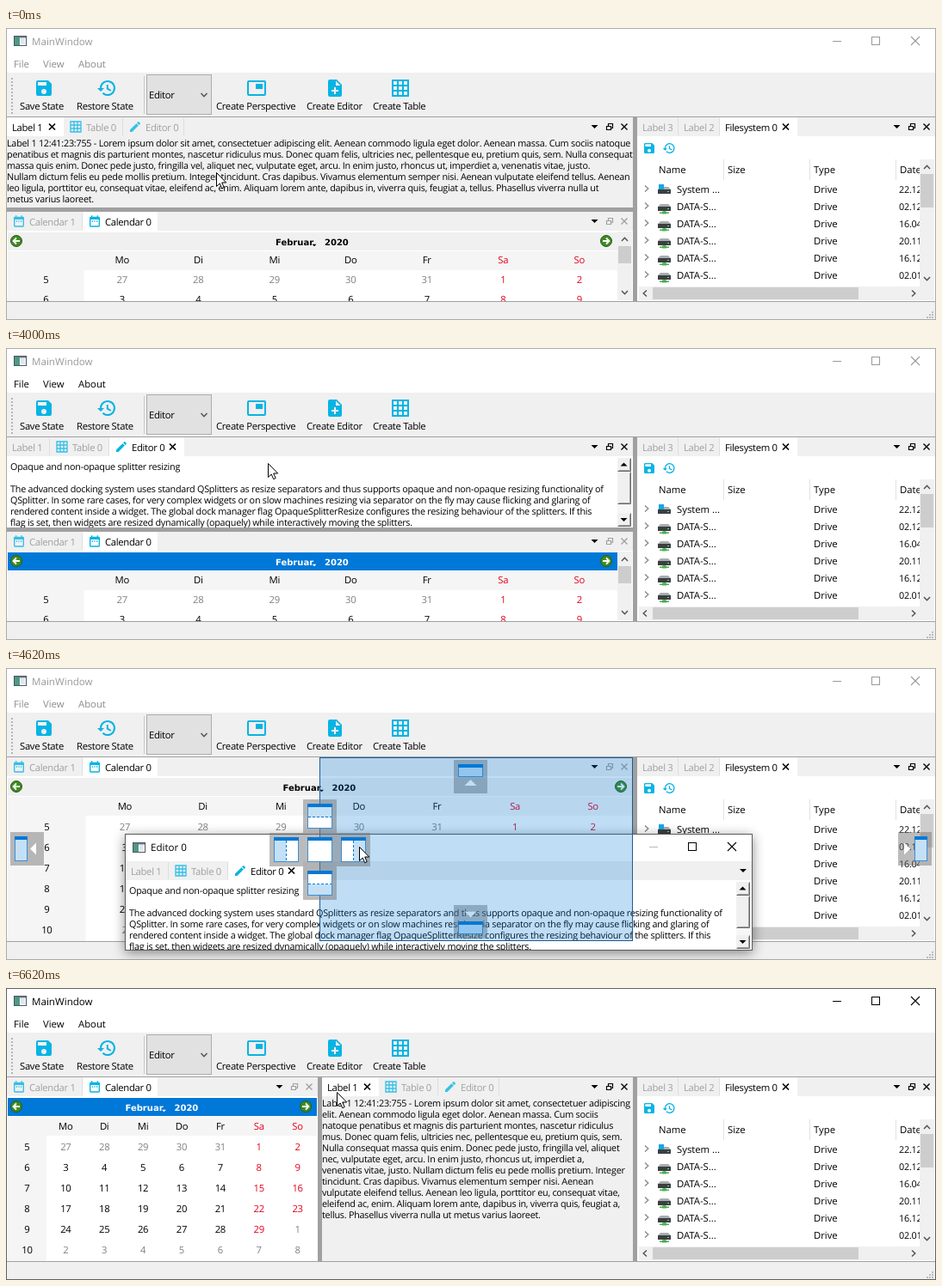
These frames come from a looping animation (1080 px wide and 340 px high, 7000 ms). An HTML page:

```html
<!DOCTYPE html>
<html lang="en">
<head>
<meta charset="utf-8">
<title>Docking demo</title>
<style>
html, body { margin: 0; width: 100%; height: 100%; overflow: hidden; background: #f0f0f0; }
#stage { display: block; width: 1080px; height: 340px; }
text { font-family: "Open Sans", "Noto Sans", sans-serif; text-rendering: geometricPrecision; white-space: pre; }
.ui { font-size: 11.3px; }
.title { font-size: 11.6px; }
.tight { font-size: 11.3px; letter-spacing: -.32px; }
.body { font-size: 10.8px; letter-spacing: -.235px; }
.bold { font: bold 10px "DejaVu Sans", sans-serif; }
</style>
</head>
<body>
<svg id="stage" viewBox="0 0 1080 340" xmlns="http://www.w3.org/2000/svg"></svg>
<script>
const BLUE = '#0078d7', CYAN = '#06b4e4', PANEL = '#f0f0f0', SPLIT = '#a0a0a0', DIM = '#a0a0a0';

const rect = (x, y, w, h, fill, extra = '') =>
  `<rect x="${x}" y="${y}" width="${w}" height="${h}" fill="${fill}" ${extra}/>`;
const box = (x, y, w, h, fill, stroke) => rect(x + .5, y + .5, w - 1, h - 1, fill, `stroke="${stroke}"`);
const path = (d, fill, extra = '') => `<path d="${d}" fill="${fill}" ${extra}/>`;
const line = (d, color, width = 1) => path(d, 'none', `stroke="${color}" stroke-width="${width}"`);
// y is the vertical middle of the text
const text = (x, y, s, cls = 'ui', fill = '#000', anchor = 'start') =>
  `<text x="${x}" y="${y + 4}" class="${cls}" fill="${fill}" text-anchor="${anchor}">${s}</text>`;
const clip = (x, y, w, h, body) =>
  `<svg x="${x}" y="${y}" width="${w}" height="${h}" viewBox="${x} ${y} ${w} ${h}">${body}</svg>`;

const ICONS = {
  save: path('M17 3H5a2 2 0 0 0-2 2v14a2 2 0 0 0 2 2h14a2 2 0 0 0 2-2V7zM12 19a3 3 0 1 1 0-6a3 3 0 0 1 0 6zM15 9H5V5h10z', CYAN),
  history: line('M5 12a8 8 0 1 1 2.4 5.7M12.8 8v4.6l4 2.4', CYAN, 2) + path('M1 12h8l-4 4z', CYAN),
  perspective: rect(2, 4, 20, 16, 'none', `stroke="${CYAN}" stroke-width="2" rx="1"`) + rect(11, 7, 8, 6, CYAN),
  note: path('M14 2H6a2 2 0 0 0-2 2v16a2 2 0 0 0 2 2h12a2 2 0 0 0 2-2V8zM16 16h-3v3h-2v-3H8v-2h3v-3h2v3h3zM13 9V3.5L18.5 9z', CYAN),
  grid: line('M3 3h18v18H3zM9 3v18M15 3v18M3 9h18M3 15h18', CYAN, 2),
  pencil: path('M3 17.2V21h3.8L17.8 9.9l-3.7-3.7zM20.7 7a1 1 0 0 0 0-1.4l-2.3-2.3a1 1 0 0 0-1.4 0l-1.9 1.8 3.8 3.8z', CYAN),
  calendar: rect(4, 5, 16, 16, 'none', `stroke="${CYAN}" stroke-width="2" rx="1"`) +
    path('M4 5h16v4H4zM6 2h2v3H6zM16 2h2v3h-2zM7 11h2v2H7zM11 11h2v2h-2zM15 11h2v2h-2z', CYAN)
};
const icon = (name, x, y, size, opacity = 1) =>
  `<g transform="translate(${x} ${y}) scale(${size / 24})" opacity="${opacity}">${ICONS[name]}</g>`;

const cross = (x, y, r, color, width) =>
  line(`M${x - r} ${y - r}l${2 * r} ${2 * r}M${x + r} ${y - r}l${-2 * r} ${2 * r}`, color, width);
const chevron = (x, y, angle, color = '#505050') =>
  `<g transform="translate(${x} ${y}) rotate(${angle})">${line('M-3.5 -2L0 1.8L3.5 -2', color, 1.4)}</g>`;
const triangle = (x, y, r, color = '#000', angle = 0) =>
  path(`M${-r} ${-r / 2}h${2 * r}L0 ${r / 2}z`, color, `transform="translate(${x} ${y}) rotate(${angle})"`);
const circle = (x, y, r, fill, extra = '') => `<circle cx="${x}" cy="${y}" r="${r}" fill="${fill}" ${extra}/>`;

const scrollbar = (x, y, h, thumb) => rect(x, y, 17, h, PANEL) + rect(x + 1, y + 17, 15, thumb, '#cdcdcd') +
  chevron(x + 8.5, y + 9, 180) + chevron(x + 8.5, y + h - 9, 0);

function classicScrollbar(x, y, h) {
  const raised = (top, height) => rect(x, top, 16, height, PANEL) +
    line(`M${x + .5} ${top + height - .5}h15v${1 - height}`, '#696969') +
    line(`M${x + 1.5} ${top + height - 1.5}h13v${3 - height}`, '#a0a0a0');
  return rect(x, y, 16, h, '#f7f7f7') + raised(y, 16) + raised(y + 16, 38) + raised(y + h - 16, 16) +
    triangle(x + 7.5, y + 7.5, 4, '#000', 180) + triangle(x + 7.5, y + h - 8, 4);
}

// "|" breaks wide lines, "/" breaks narrow ones
const LOREM = 'Label 1 12:41:23:755 - Lorem ipsum dolor sit amet, consectetuer adipiscing/elit. Aenean commodo ligula eget dolor. Aenean massa. Cum sociis/natoque|penatibus et magnis dis parturient montes, nascetur ridiculus/mus. Donec quam felis, ultricies nec, pellentesque eu, pretium quis, sem./Nulla consequat|massa quis enim. Donec pede justo, fringilla vel, aliquet/nec, vulputate eget, arcu. In enim justo, rhoncus ut, imperdiet a,/venenatis vitae, justo.|Nullam dictum felis eu pede mollis pretium. Integer/tincidunt. Cras dapibus. Vivamus elementum semper nisi. Aenean/vulputate eleifend tellus. Aenean|leo ligula, porttitor eu, consequat vitae,/eleifend ac, enim. Aliquam lorem ante, dapibus in, viverra quis, feugiat a,/tellus. Phasellus viverra nulla ut|metus varius laoreet.';
const MANUAL = 'The advanced docking system uses standard QSplitters as resize/separators and thus supports opaque and non-opaque resizing/functionality of|QSplitter. In some rare cases, for very complex widgets/or on slow machines resizing via separator on the fly may cause flicking/and glaring of|rendered content inside a widget. The global dock/manager flag OpaqueSplitterResize configures the resizing behaviour of/the splitters. If this|flag is set, then widgets are resized dynamically/(opaquely) while interactively moving the splitters.';
const wrap = (s, narrow) => narrow ? s.replace(/\|/g, ' ').split('/') : s.replace(/\//g, ' ').split('|');
const paragraph = (x, y, lines) => lines.map((s, i) => text(x, y + 13 * i, s, 'body')).join('');

// Contents take the area below the tab bar
const labelView = (x, y, w, h) => rect(x, y, w, h, PANEL) + paragraph(x, y + 8, wrap(LOREM, w < 500));

function editorView(x, y, w, h) {
  const narrow = w < 500;
  return rect(x, y, w, h, '#fff') + text(x + 4, y + 12, 'Opaque and non-opaque splitter resizing', 'body') +
    paragraph(x + 4, y + 38, wrap(MANUAL, narrow)) + (narrow ? '' : classicScrollbar(x + w - 18, y + 2, h - 3));
}

function tableView(x, y, w, h) {
  const left = x + 23, grid = '#d8d8d8', tall = h > 120, view = w - 19, bottom = y + h - (tall ? 18 : 1);
  let out = rect(x, y, w, h, '#fff'), cells = line(`M${left + .5} ${y + 2}V${bottom}M${x} ${y + 26.5}H${left}`, grid);
  for (let c = 1; c <= 5; c++) {
    const right = left + c * 100;
    cells += text(right - 50, y + 14, 'Col ' + c, 'ui', '#000', 'middle') + line(`M${right + .5} ${y + 2}V${bottom}`, grid);
  }
  for (let r = 1; y + r * 30 < bottom; r++) {
    const mid = y + 10 + r * 30;
    cells += text(x + 9, mid, r, 'ui', '#000', 'middle') + line(`M${x} ${mid + 15.5}H${left + 500}`, grid);
    for (let c = 1; c <= 5; c++) cells += text(left + c * 100 - 96, mid, `T ${r}-${c}`);
  }
  out += clip(x, y, view, bottom - y, cells) + scrollbar(x + view, y + 2, bottom - y - 2, tall ? 70 : 18);
  if (tall) {
    out += rect(x, bottom, w, 17, PANEL) + rect(x + 17, bottom + 1, 210, 15, '#cdcdcd') +
      chevron(x + 8, bottom + 8, 90) + chevron(x + view - 9, bottom + 8, -90);
  }
  return out + box(x + 1, y + 1, w - 1, h - 1, 'none', '#8a8f99');
}

function calendarView(x, y, w, h, active) {
  const short = h < 120, left = x + 1, width = w - (short ? 19 : 2), top = y + 2, col = width / 8, rowH = short ? 23 : 24;
  const mid = left + width / 2, head = active ? '#fff' : '#000', rowY = i => top + 10 + (short ? 22 : 23) + rowH * i;
  const nav = (cx, angle) => `<g transform="translate(${cx} ${top + 10}) rotate(${angle})">` +
    circle(0, 0, 6.5, '#3f8a22', 'stroke="#2a5c1c"') + line('M4 0H-3M0 -3.5L-3.5 0L0 3.5', '#fff', 1.8) + '</g>';
  let out = rect(x, y, w, h, '#fff') + rect(left, top, width, 21, active ? BLUE : PANEL) +
    rect(left, top + 22, width, 22, '#f5f5f5') + rect(left, top + 22, col, h, '#f5f5f5') +
    text(mid - 43, top + 11, 'Februar', 'bold', head) + triangle(mid + 2, top + 15, 2.5, head) +
    text(mid + 14, top + 11, '2020', 'bold', head) + nav(left + 10, 0) + nav(left + width - 13, 180);
  const cell = (c, r, s, fill) => text(left + col * (c + .5), rowY(r), s, 'tight', fill, 'middle');
  ['Mo', 'Di', 'Mi', 'Do', 'Fr', 'Sa', 'So'].forEach((d, i) => out += cell(i + 1, 0, d, i > 4 ? '#e8001c' : '#000'));
  for (let week = 0; week < 6; week++) {
    out += cell(0, week + 1, week + 5, '#000');
    for (let d = 0; d < 7; d++) {
      const date = new Date(2020, 0, 27 + week * 7 + d);
      const color = date.getMonth() !== 1 ? '#808080' : d > 4 ? '#e8001c' : '#000';
      out += cell(d + 1, week + 1, date.getDate(), color);
    }
  }
  return out + (short ? scrollbar(x + w - 18, y + 1, h - 2, 20) : '');
}

function drive(x, y, system) {
  return path(`M${x + 3} ${y - 3}h9l3 3h-15z`, '#a9adb0') + rect(x, y, 15, 5, '#3b3f42') + rect(x + 11, y + 2, 2, 1, '#6fe06f') +
    (system ? rect(x + 1, y - 6, 6, 6, '#18a5e8')
            : rect(x + 6.5, y + 5, 2, 2, '#4caf50') + rect(x + 2, y + 6.5, 11, 1.5, '#4caf50') + rect(x + 5, y + 5.5, 5, 3, '#4caf50'));
}

function filesView(x, y, w, h) {
  let out = rect(x, y, w, h, '#fff') + icon('save', 739, 132, 16) + icon('history', 762, 132, 16);
  let tree = '';
  ['Name', 'Size', 'Type', 'Date'].forEach((s, i) => {
    const left = i ? 738 + i * 100 : 758;
    tree += text(left, 165, s) + (i ? line(`M${left - 4.5} 153v24`, '#e2e2e2') : '');
  });
  ['22.12', '02.12', '16.04', '20.11', '16.12', '02.01'].forEach((date, i) => {
    const mid = 188 + i * 20;
    tree += chevron(744, mid - 1, -90, '#8a8a8a') + drive(757, mid, !i) + text(779, mid, i ? 'DATA-S...' : 'System ...') +
      text(938, mid, 'Drive') + text(1037, mid, date + '.2019', 'body');
  });
  out += clip(735, 150, 327, 151, tree) + scrollbar(1061, 153, 148, 39);
  return out + rect(735, 301, 343, 16, PANEL) + rect(751, 302, 239, 14, '#cdcdcd') +
    chevron(742, 309, 90) + chevron(1054, 309, -90);
}

const DOCS = [
  { name: 'Label 1', width: 50, wide: 66, close: true },
  { name: 'Table 0', width: 69, wide: 85, icon: 'grid', close: true },
  { name: 'Editor 0', width: 71, wide: 87, icon: 'pencil', close: true }
];
const DOC_VIEWS = [labelView, tableView, editorView];
const CALENDARS = [1, 0].map(n => ({ name: 'Calendar ' + n, width: 88, wide: 87, icon: 'calendar' }));
const FILES = [
  { name: 'Label 3', width: 48 }, { name: 'Label 2', width: 48 },
  { name: 'Filesystem 0', wide: 90, close: true }
];

// buttons: 'on', 'off' (greyed) or 'menu' (drop-down only)
function group(x, y, w, h, tabs, current, buttons, view) {
  const mid = y + 11, right = x + w;
  let out = rect(x, y, w, 22, PANEL), left = x;
  tabs.forEach((tab, i) => {
    const on = i === current, width = on ? tab.wide : tab.width;
    out += on ? rect(left, y, width, 23, '#fff') : rect(left + width - 1, y + 1, 1, 20, '#dedede');
    if (tab.icon) out += icon(tab.icon, left + 6, mid - 8, 16, on ? 1 : .8);
    out += text(left + (tab.icon ? 26 : 6), mid + 1, tab.name, 'tight', on ? '#000' : DIM);
    if (on && tab.close) out += cross(left + width - 13.5, mid, 3.5, '#000', 1.7);
    left += width;
  });
  if (buttons === 'menu') out += triangle(right - 10, mid, 4);
  else {
    const color = buttons === 'on' ? '#000' : DIM;
    out += triangle(right - 44.5, mid, 4) +
      line(`M${right - 28.5} ${mid - 1}v-2.5h5v5h-2M${right - 30.5} ${mid - .5}h5v4h-5z`, color, 1.2) +
      cross(right - 10, mid, 3.5, color, 1.4);
  }
  return out + clip(x, y + 22, w, h - 22, view(x, y + 22, w, h - 22));
}

const appIcon = (x, y) => box(x, y, 15, 12, '#fff', '#4a5560') + rect(x + 1, y + 2, 6, 9, '#4d9a86') +
  rect(x + 1, y + 1, 13, 1.5, '#6a7f98') + rect(x + 8, y + 3, 5, 7, '#dfe8ef');
const captionButtons = (right, y, color, minColor = color) => line(`M${right - 120} ${y + .5}h10`, minColor) +
  box(right - 75, y - 5, 10, 10, 'none', color) + cross(right - 24, y, 5, color, 1.1);

function mainWindow(titleOn, menuOn) {
  const title = titleOn ? '#000' : '#999', menu = menuOn ? '#000' : '#8c8c8c';
  let out = rect(0, 0, 1080, 340, PANEL) + rect(0, 0, 1080, 52, '#fff') + appIcon(9, 9) +
    text(30, 16, 'MainWindow', 'title', title) + captionButtons(1080, 15, title);
  [[9, 'File'], [43, 'View'], [84, 'About']].forEach(([x, s]) => out += text(x, 42, s, 'ui', menu));
  for (let y = 58; y < 99; y += 4) out += rect(6, y, 2, 2, '#b5b5b5');
  out += rect(160, 56, 1, 44, '#c8c8c8') + box(163, 54, 76, 47, '#e1e1e1', '#adadad') + text(166, 78, 'Editor', 'tight') + chevron(230, 78, 0);
  [['save', 32, 16, 'Save State'], ['history', 105, 82, 'Restore State'], ['perspective', 279, 244, 'Create Perspective'],
   ['note', 370, 349, 'Create Editor'], ['grid', 446, 426, 'Create Table']]
    .forEach(([name, ix, tx, s]) => out += icon(name, ix, 58, 24) + text(tx, 91, s, 'tight'));
  out += rect(0, 103, 1080, 216, SPLIT);
  for (let r = 0; r < 3; r++) for (let c = 0; c <= r; c++) out += rect(1075 - c * 3, 330 + r * 3, 2, 2, '#bdbdbd');
  return out;
}

const floating = (x, y, opacity) => `<g opacity="${opacity}"><g style="filter:drop-shadow(0 3px 7px rgba(0,0,0,.45))">` +
  box(x, y, 729, 136, '#fff', '#5c5c5c') + '</g>' + appIcon(x + 9, y + 10) + text(x + 30, y + 16, 'Editor 0', 'title') +
  captionButtons(x + 729, y + 15, '#000', '#b8b8b8') + group(x + 1, y + 32, 727, 103, DOCS, 2, 'menu', editorView) + '</g>';

const backing = (x, y) => rect(x, y, 39, 39, '#787878', 'opacity=".5"');
const miniWindow = (x, y, w, h, fill) => box(x, y, w, h, fill, '#3b8fd6') + rect(x, y, w, 4, BLUE);

// Icons for docking at the outer edges
const edgeIcons = () => backing(520, 107) + miniWindow(525, 112, 29, 15, '#c4e0f6') + triangle(539.5, 133.5, 7, '#fff', 180) +
  backing(520, 276) + triangle(539.5, 287, 7, '#fff') + miniWindow(525, 295, 29, 15, '#c4e0f6');
const sideIcons = () => backing(5, 191) + miniWindow(10, 196, 15, 29, '#c4e0f6') + triangle(31.5, 210.5, 7, '#fff', 90) +
  backing(1036, 191) + miniWindow(1055, 196, 15, 29, '#c4e0f6') + triangle(1046.5, 210.5, 7, '#fff', -90);

function crossIcons() {
  let out = '';
  [[0, 0], [0, -1], [0, 1], [-1, 0], [1, 0]].forEach(([dx, dy]) => {
    const x = 350 + 39 * dx, y = 197 + 39 * dy;
    out += backing(x - 5, y - 5) + miniWindow(x, y, 29, 29, '#fff');
    if (dx) out += rect(x + (dx > 0 ? 15 : 1), y + 4, 13, 24, '#c4e0f6');
    if (dy) out += rect(x + 1, y + (dy > 0 ? 16 : 4), 27, 12, '#c4e0f6');
    if (dx || dy) out += path(dx ? `M${x + 14.5} ${y + 4}v24` : `M${x + 1} ${y + 15.5}h27`, 'none', `stroke="${BLUE}" stroke-dasharray="3 2"`);
  });
  return out;
}
const preview = (x, y, w, h) => rect(x + .5, y + .5, w - 1, h - 1, BLUE, 'fill-opacity=".25" stroke="#1d5c95"');

const arrow = (x, y) => path('M.5 .5V16.5L4.2 13L6.7 18.7L9.2 17.6L6.7 12H11.7z', '#fff', `stroke="#000" transform="translate(${x} ${y})"`);
const beam = (x, y) => line(`M${x - 3} ${y - 7.5}h2.5l.5 .5l.5 -.5h2.5M${x} ${y - 7}v14M${x - 3} ${y + 7.5}h2.5l.5 -.5l.5 .5h2.5`, '#000');

// [first tick, ticks, x, y]: the pointer glides to x, y
const MOVES = [
  [4, 5, 112, 115], [9, 1, 103, 118], [13, 4, 166, 120], [23, 3, 272, 120], [32, 1, 304, 134],
  [33, 2, 358, 162], [35, 3, 410, 208], [43, 1, 446, 183], [44, 4, 441, 121], [49, 2, 384, 121]
];
function pointer(tick) {
  let x = 244, y = 168;
  for (const [start, count, toX, toY] of MOVES) {
    const part = Math.min(1, Math.max(0, (tick - start + 1) / count));
    x += (toX - x) * part;
    y += (toY - y) * part;
  }
  return [Math.round(x), Math.round(y)];
}

function scene(tick) {
  const [px, py] = pointer(tick);
  const titleOn = tick >= 10 && tick < 32 || tick >= 40;
  const menuOn = tick >= 11 && tick < 33 || tick >= 41;
  const doc = tick < 11 ? 0 : tick < 18 ? 1 : tick < 48 ? 2 : tick < 53 ? 1 : 0;
  const dragging = tick >= 33 && tick < 39;
  const calendar = (...area) => calendarView(...area, menuOn);
  let out = mainWindow(titleOn, menuOn) + group(733, 104, 346, 214, FILES, 2, 'on', filesView);

  if (dragging) out += group(1, 104, 727, 214, CALENDARS, 1, 'off', calendar);
  else if (tick < 33) {
    out += group(1, 104, 727, 105, DOCS, doc, 'on', DOC_VIEWS[doc]) + group(1, 214, 727, 104, CALENDARS, 1, 'off', calendar);
  } else {
    out += group(1, 104, 361, 214, CALENDARS, 1, 'off', calendar) + group(367, 104, 361, 214, DOCS, doc, 'on', DOC_VIEWS[doc]);
  }
  out += box(0, 0, 1080, 340, 'none', titleOn ? '#606060' : '#aaa');

  if (dragging) {
    const lag = tick < 35 ? [281, 21] : [272, 15];
    const frame = floating(px - lag[0], py - lag[1], tick === 33 ? .6 : tick === 34 ? .94 : 1);
    const overlay = edgeIcons() + sideIcons() + (px > 384 ? preview(364, 104, 364, 214) : preview(1, 104, 728, 107)) + crossIcons();
    out += tick === 33 ? frame : tick === 34 ? overlay + frame : frame + overlay;
  }
  const overText = tick >= 41 && tick < 45;
  return out + (overText ? beam(px + .5, py + .5) : arrow(px, py));
}

// The picture changes on ticks of an eighth of a second, rounded down to 10 ms
const stage = document.getElementById('stage');
let shown = -1;
function update(ms) {
  const tick = Math.floor((Math.floor(ms % 7000 / 10) * 10 + 5) / 125);
  if (tick !== shown) stage.innerHTML = scene(shown = tick);
}
const begin = performance.now();
function loop() {
  update(performance.now() - begin);
  requestAnimationFrame(loop);
}
loop();
</script>
</body>
</html>
```
